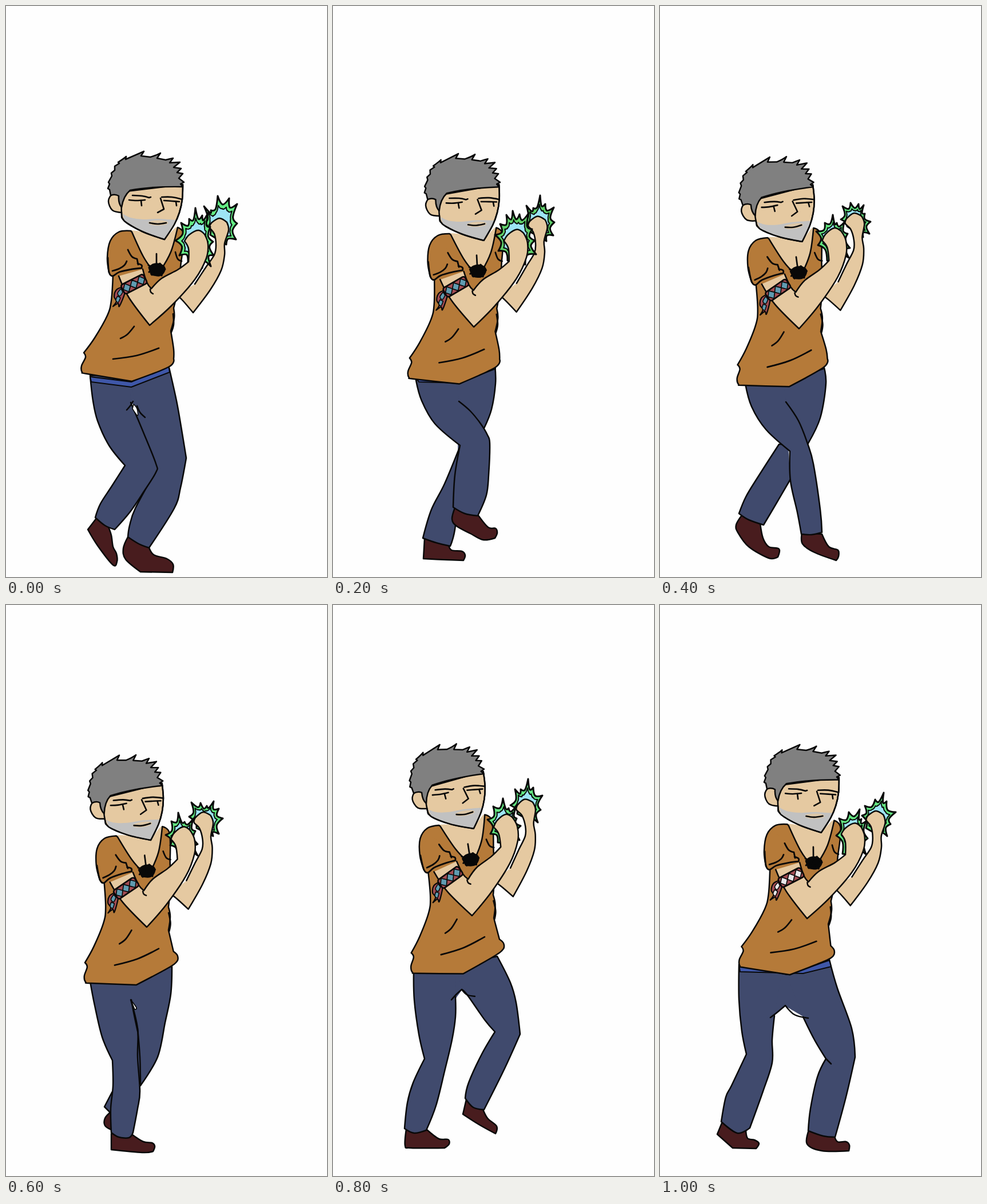
Write an HTML page that moves like this. It is 561 px wide and 998 px high and loops after 1.2 s.

```html
<!DOCTYPE html>
<html lang="en">
<head>
<meta charset="utf-8">
<title>Walk cycle with flaming fists</title>
<style>
html, body { margin: 0; width: 100%; height: 100%; overflow: hidden; background: #fefefe; }
svg { display: block; width: 100%; height: 100%; }
g.pose { visibility: hidden; }
g.pose.on { visibility: visible; }
</style>
</head>
<body>
<svg id="stage" viewBox="0 0 561 998" fill="none" stroke-linejoin="round" stroke-linecap="round"></svg>
<script>
const INK = '#080808', SKIN = '#e5c9a1', SHIRT = '#b57a39', PANTS = '#404a6d',
  SHOE = '#481c1e', BELT = '#3f57a8', HAIR = '#808080', BEARD = '#c1c1c1';
const STEP = 200, ELBOW = [251, 558];

const points = text => text.split(',').map(t => {
  const [x, y] = t.replace('!', '').trim().split(' ').map(Number);
  return { x, y, hard: t.includes('!') };
});

// Smooth line through the points; "!" marks a corner.
function curve(text) {
  const p = points(text);
  const tan = i => {
    const a = p[i - 1], b = p[i + 1];
    return !a || !b || p[i].hard ? [0, 0] : [(b.x - a.x) / 6, (b.y - a.y) / 6];
  };
  let d = `M${p[0].x} ${p[0].y}`;
  for (let i = 1; i < p.length; i++) {
    const a = p[i - 1], b = p[i], s = tan(i - 1), e = tan(i);
    d += `C${a.x + s[0]} ${a.y + s[1]} ${b.x - e[0]} ${b.y - e[1]} ${b.x} ${b.y}`;
  }
  return d;
}
const path = (d, fill, width = 2.5) =>
  `<path d="${d}" fill="${fill}" ${width ? `stroke="${INK}" stroke-width="${width}"` : ''}/>`;
const shape = (text, fill, width) => path(curve(text) + 'Z', fill, width);
const open = (text, fill = 'none', width) => path(curve(text), fill, width);
const lines = (list, width) => list.map(t => open(t, 'none', width)).join('');

const lerp = (a, b, k) => ({ x: a.x + (b.x - a.x) * k, y: a.y + (b.y - a.y) * k });

// Spiky outline: valleys lie between the tips, drawn in towards the fist.
function spikes(tips, mid, pull, depth) {
  const t = tips.map(p => lerp(p, mid, pull));
  let d = `M${t[0].x} ${t[0].y}`;
  for (let i = 1; i < t.length; i++) {
    const a = t[i - 1], b = t[i], v = lerp(lerp(a, b, .5), mid, depth);
    const c1 = lerp(lerp(a, v, .55), mid, .1), c2 = lerp(lerp(v, b, .45), mid, .12);
    d += `Q${c1.x} ${c1.y} ${v.x} ${v.y}Q${c2.x} ${c2.y} ${b.x} ${b.y}`;
  }
  return d + 'Z';
}
function flame(text, mid, color) {
  const tips = points(text);
  return path(spikes(tips, mid, 0, .24), color, 3) +
    path(spikes(tips, mid, .3, .1), '#9de5f4', 2);
}

const head = () =>
  open('199 332!,186 329,179 341,186 357,203 361', SKIN) +
  shape('202 325!,202 362,206 374,238 394,277 408!,294 382,303 361,308 338,309 312!', SKIN) +
  shape('204 363!,218 370,240 373,265 372,297 374!,292 387,277 407!,238 393,207 375!', BEARD, 0) +
  '<ellipse cx="266" cy="379" rx="17" ry="4.5" fill="#dcc6a6"/>' +
  open('202 361!,207 376,238 394,277 408!,294 382,303 361,308 338,309 312') +
  path('M183 331L181 321 178 319 181 311 179 308 185 297 184 292 190 287 190 280 198 275 ' +
    '196 273Q207 266 210 263L209 268Q225 261 241 254L236 262 252 264Q263 261 270 257L264 266 ' +
    '279 269Q287 267 292 266L286 274 304 273 293 282 306 284 299 291 309 293 302 301 311 308 ' +
    '305 311 309 316Q255 315 217 322Q205 332 202 352Q196 345 197 332Q191 328 183 331Z', HAIR) +
  lines(['215 339,228 340,243 339', '221 331,238 332,250 335!,253 334', '236 340,237 349',
    '272 334,290 334,308 338', '276 340,290 341,303 342', '297 342,298 349',
    '270 336,276 355!,265 361', '251 379,265 381,280 379'], 2.6);

const torso = bulge =>
  shape('216 392!,238 395,277 409!,300 387,290 440,267 474!,240 440', SKIN, 0) +
  shape('218 393!,197 395,182 411,177 440,180 466!,187 470!,184 515,177 541,155 580,136 606!,' +
    '139 614,132 629,133 640,142 643,220 656!,' +
    (bulge ? '278 634,296 624,298 614,292 606!,' : '284 631,293 617!,293 600,') +
    '288 568!,294 545,293 528!,300 500!,306 447!,311 400,300 387!,288 430,270 462!,' +
    '258 464!,240 438,220 395!', SHIRT) +
  lines(['200 581,212 574,224 560', '187 617,228 611,267 598', '289 570,293 556,292 538',
    '263 433,263 450', '296 430,300 442,307 446'], 2.7) +
  shape('250 457!,257 452,266 451,276 456,276 464,268 471,254 469', INK, 3) +
  lines(['249 453!,260 459!,255 470!,265 465!,272 471!,274 460!,278 460!,269 450!,250 465'], 3);

const farArm = () =>
  open('299 505!,310 516,327 536!,357 496,376 462,382 435,382 415,389 392,386 378!,' +
    '373 371,359 379!,356 387,364 398,367 418,364 435,349 457,330 486', SKIN);

const diamond = x => `M${x} 9l7 -8 7 8 -7 8z`;
const nearArm = gem =>
  open('197 472!,215 510,251 558!,290 523,330 478,350 441,353 416,347 399!,336 392,320 400,' +
    '312 411!,319 424,319 447!,300 461,272 476,254 494!,246 483,239 460', SKIN) +
  open('252 495,253 500,257 503') +
  shape('204 491!,193 496,189 508,193 516,187 525!,196 520,198 525,206 507,208 499!', '#a34d54', 2.2) +
  shape('201 494!,195 502,199 507,204 500', gem, 1.6) +
  shape('195 507!,192 514,196 518,200 510', gem, 1.6) +
  `<g transform="translate(200 488) rotate(-27)"><rect width="44" height="18" rx="4" ` +
  `fill="#a34d54" stroke="${INK}" stroke-width="2.7"/>` +
  path([1, 15, 29].map(diamond).join(''), gem, 1.7) + '</g>' +
  shape('200 410!,182 428,180 465!,186 472,198 465,237 458!,236 451,228 444!,215 420', SHIRT, 0) +
  lines(['178 440,180 465,186 472,198 465,220 460,237 458!,237 453,230 450',
    '186 463,198 459,207 453,211 446', '213 426,220 438,229 442!,231 452'], 2.8);

const BLUE = '#5f9bb1';

// elbow place, lean in degrees, legs and shoes (far first), flames (far first)
const poses = [
  { at: [251, 558], lean: 0, green: '#63ec84',
    hips: '147 642!,285 630!,240 715!,220 694',
    shoes: ['213 928!,205 948,209 967,235 989!,291 990!,292 976,281 966,258 959,249 944',
      '159 894!,143 915!,160 943,187 977,194 971,193 957,187 945,184 925,178 908'],
    legs: ['215 635!,285 632!,298 690,306 735,315 790!,305 842,294 878,250 947!,232 940,213 928!,' +
      '216 908,226 878,262 812!,252 780,230 722',
      '215 640!,147 646!,152 690,160 725,180 768,208 803!,185 839,165 870,156 894!,173 908,190 915!,' +
      '217 884,240 850,262 815,262 800,240 745,218 693'],
    extra: shape('223 696!,229 704,230 716,221 704', '#fefefe', 1.5) +
      lines(['229 699,234 710,243 719', '211 706,217 699,222 691']),
    belt: '147 648!,219 657!,284 628!,286 640!,219 666!,149 657',
    fire: ['357 400,347 380,346 350,358 357,370 332,390 336,404 346,404 380,402 408,385 417',
      '318 448,303 436,296 410,306 379,320 372,331 353,343 366,354 360,357 386,362 412,363 436,358 455,343 458'] },

  { at: [246, 561], lean: 3.2, green: '#5fd069',
    hips: '146 650!,284 634!,264 738!,220 695',
    shoes: ['160 931!,158 966!,200 968,228 969!,231 960,225 953,207 951,202 941',
      '213 877!,208 897,216 909,240 922,262 933,283 930!,287 921,284 913,271 911,253 889'],
    legs: ['215 640!,283 629!,284 660,277 705,264 738!,223 767!,195 835,172 880,157 930!,180 938,' +
      '205 944!,213 915,220 850',
      '215 645!,145 654!,155 690,178 730,222 768!,213 820,210 876!,230 887,253 891!,268 855,272 820,' +
      '274 765,270 750,258 730,240 708,220 691'],
    extra: '', belt: '146 650!,184 656!,222 660!,283 627!,284 634!,258 644!,220 659!,150 657',
    fire: ['345 395,334 376,338 349,350 353,362 331,371 346,386 352,387 378,385 401,373 411',
      '305 445,289 428,283 400,292 381,303 365,314 358,326 364,342 362,348 390,353 410,355 434,336 452'] },

  { at: [243, 564], lean: 7.8, green: '#60e47f',
    hips: '150 656!,288 634!,258 766!,220 696',
    shoes: ['143 890!,133 907,136 920,155 945,190 965,206 963!,208 949,190 945,180 930,175 904',
      '248 921!,249 940,270 955,308 969!,312 962,311 951,295 945,283 923'],
    legs: ['215 640!,286 629!,290 660,280 720,258 766!,208 766!,170 825,150 858,138 887!,155 898,' +
      '181 907!,200 875,228 827',
      '215 645!,149 660!,160 700,185 740,227 778!,228 830,240 885,247 923!,265 924,283 920!,280 880,' +
      '268 800,258 765,242 725,220 692'],
    extra: open('266 641,286 634', 'none', 2),
    fire: ['327 385,316 373,319 350,333 344,347 346,356 348,358 363,368 377,366 398,355 404',
      '292 445,276 418,273 394,288 379,302 365,309 379,322 378,328 398,332 423,330 440,318 450'] },

  { at: [246, 563], lean: 7.2, bulge: true, green: '#60e47f',
    hips: '148 655!,290 634!,265 790!,222 695',
    shoes: ['183 886!,173 897,173 910,184 917',
      '184 924!,184 952!,238 957,257 955!,260 946,255 940,240 938,221 926'],
    legs: ['215 640!,290 632!,288 680,278 730,265 790,235 840!,200 830!,185 852!,172 877!,184 889',
      '215 645!,147 658!,155 700,168 755,186 796!,187 840,183 880,184 922!,197 930,215 931,222 922!,' +
      '230 880,234 850,230 790,230 740,218 690'],
    extra: shape('218 690!,228 704,225 707', '#fefefe', 1.7) +
      lines(['219 690,223 712,230 745', '230 740,234 790,235 840']),
    fire: ['333 390,320 370,324 345,340 346,351 351,363 343,372 356,379 373,372 400,362 404',
      '300 440,287 420,279 402,289 378,301 363,312 379,327 374,331 395,335 418,335 438,325 442'] },

  { at: [243, 543], lean: 8.8, bulge: true, green: '#62e581',
    hips: '142 636!,287 615!,260 710!,225 673!,213 690',
    shoes: ['233 864!,227 890!,255 908,284 924!,286 911,270 897,261 879',
      '128 916!,126 945,136 949,195 949!,203 942,201 934,185 933,164 917'],
    legs: ['215 630!,287 614!,310 660,320 695,327 750!,300 810,264 882!,245 878,231 862!,237 835,' +
      '260 785,283 746!,265 725,235 682,225 672',
      '215 630!,141 640!,142 690,150 750,160 793!,140 835,130 870,125 915!,142 923,163 918!,180 875,' +
      '195 815,208 760,214 720,214 685'],
    extra: lines(['207 690,216 680,225 672!,234 681,248 684']),
    fire: ['322 365,310 350,318 322,328 322,341 304,350 319,366 333,363 358,358 380,350 380',
      '288 415,275 400,270 375,280 352,297 338,307 355,320 352,321 373,328 386,326 411,315 418'] },

  { at: [257, 548], lean: .5, bulge: true, green: '#62e581', gem: '#e8e6e8',
    hips: '139 630!,297 622!,270 745!,255 722!,219 701!,195 722',
    shoes: ['260 918!,257 942,283 954,330 954!,331 944,325 938,310 938,304 925',
      '109 903!,100 925!,127 949!,168 950!,173 941,165 935,153 932,150 917'],
    legs: ['215 630!,296 620!,310 670,335 740,341 790!,325 860,306 930!,285 928,259 919!,263 880,' +
      '275 825,290 793!,270 760,250 720',
      '215 630!,138 628!,138 690,143 745,151 785!,125 840,115 860,107 903!,135 923,157 914!,180 850,' +
      '196 800,196 760,200 718'],
    extra: lines(['193 721,206 711,219 700!,235 716,259 722', '290 793,299 802']),
    belt: '138 628!,222 646!,296 621!,299 632!,250 644!,140 641',
    fire: ['360 390,353 368,358 351,376 340,391 328,396 343,412 362,403 383,397 404,386 405',
      '319 435,308 403,313 373,330 362,349 357,352 374,360 378,363 408,360 436,347 438'] }
];

function draw(p) {
  const [ex, ey] = ELBOW, [ax, ay] = p.at, a = p.lean * Math.PI / 180;
  const lean = s => `<g transform="translate(${ax} ${ay}) rotate(${-p.lean}) translate(${-ex} ${-ey})">${s}</g>`;
  const place = (x, y) => ({
    x: ax + (x - ex) * Math.cos(a) + (y - ey) * Math.sin(a),
    y: ay - (x - ex) * Math.sin(a) + (y - ey) * Math.cos(a)
  });
  return '<g class="pose">' +
    shape(p.hips, PANTS, 0) +
    p.legs.map((leg, i) => shape(p.shoes[i], SHOE) + open(leg, PANTS)).join('') +
    p.extra + (p.belt ? shape(p.belt, BELT, 2) : '') +
    lean(torso(p.bulge) + head()) +
    flame(p.fire[0], place(373, 388), p.green) + lean(farArm()) +
    flame(p.fire[1], place(333, 412), p.green) + lean(nearArm(p.gem || BLUE)) + '</g>';
}

const stage = document.getElementById('stage');
stage.innerHTML = poses.map(draw).join('');
const groups = [...stage.children];
const start = performance.now();

function tick(now) {
  const n = Math.floor(Math.max(0, now - start) / STEP) % poses.length;
  groups.forEach((g, i) => g.classList.toggle('on', i === n));
  requestAnimationFrame(tick);
}
tick(start);
</script>
</body>
</html>
```
